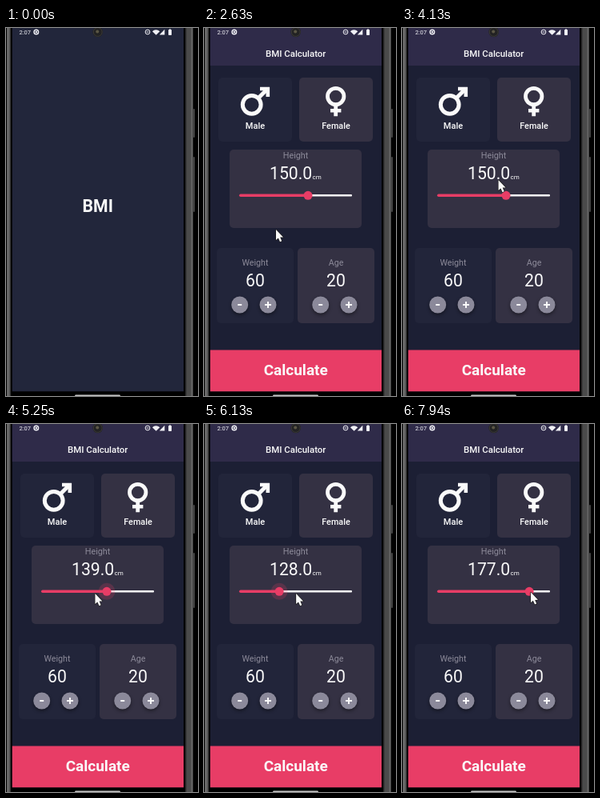
Recreate the animation shown at these times as an HTML page with a canvas. Size 240x460 px, loop 8000 ms.

```html
<!DOCTYPE html>
<html lang="en">
<head>
<meta charset="utf-8">
<title>BMI Calculator</title>
<style>
html, body { margin: 0; width: 240px; height: 460px; overflow: hidden; background: #000; }
canvas { display: block; width: 240px; height: 460px; }
</style>
</head>
<body>
<canvas id="stage"></canvas>
<script>
const LOOP = 8000;
const RED = '#e83d66', CARD = '#343143', DIM = '#22253a', GREY = '#8d8b9a', WHITE = '#fafafa';
const SCREEN = { x: 7.5, w: 214.5, h: 454.4 };
const canvas = document.getElementById('stage');
const ctx = canvas.getContext('2d');
const dpr = window.devicePixelRatio || 1;
canvas.width = 240 * dpr;
canvas.height = 460 * dpr;

// Cursor position while free: time, x or y
const freeX = [[2360, 90], [2900, 90], [3560, 101], [4130, 120.5], [4400, 129], [4700, 130]];
const freeY = [[2360, 252], [2900, 252], [3560, 230], [4130, 190], [4300, 192], [4650, 211], [5250, 212], [6130, 212], [7940, 210.3]];
// Pointer position along the slider
const drag = [[4700, 130], [4950, 130], [5130, 126], [5190, 116], [5250, 111.5], [5720, 80],
  [6010, 94], [6070, 103], [6130, 115], [6500, 151], [7050, 100], [7450, 112],
  [7820, 159], [7880, 163], [7940, 161], [8000, 160]];

const clamp = (v, a = 0, b = 1) => Math.min(b, Math.max(a, v));
const ramp = (t, a, b) => clamp((t - a) / (b - a));

// Smooth curve through key points, flat at turning points
function along(keys, t) {
  const n = keys.length - 1;
  if (t <= keys[0][0]) return keys[0][1];
  if (t >= keys[n][0]) return keys[n][1];
  let i = 0;
  while (keys[i + 1][0] < t) i++;
  const slope = k => (keys[k + 1][1] - keys[k][1]) / (keys[k + 1][0] - keys[k][0]);
  const tangent = k => {
    if (k === 0 || k === n) return 0;
    const a = slope(k - 1), b = slope(k);
    return a * b <= 0 ? 0 : 2 * a * b / (a + b);
  };
  const [t0, a] = keys[i], [t1, b] = keys[i + 1];
  const h = t1 - t0, u = (t - t0) / h, w = 1 - u;
  return a * w * w * (1 + 2 * u) + b * u * u * (3 - 2 * u)
    + h * u * w * (w * tangent(i) - u * tangent(i + 1));
}

function rect(x, y, w, h, color, r = 0) {
  ctx.fillStyle = color;
  ctx.beginPath();
  ctx.roundRect(x, y, w, h, r);
  ctx.fill();
}

function disc(x, y, r, color) {
  ctx.fillStyle = color;
  ctx.beginPath();
  ctx.arc(x, y, r, 0, 7);
  ctx.fill();
}

function ring(x, y, r, width, color) {
  ctx.strokeStyle = color;
  ctx.lineWidth = width;
  ctx.beginPath();
  ctx.arc(x, y, r, 0, 7);
  ctx.stroke();
}

function path(points, width, color) {
  ctx.strokeStyle = color;
  ctx.lineWidth = width;
  ctx.beginPath();
  points.forEach(([x, y]) => ctx.lineTo(x, y));
  ctx.stroke();
}

function poly(points, color) {
  ctx.fillStyle = color;
  ctx.beginPath();
  points.forEach(([x, y]) => ctx.lineTo(x, y));
  ctx.closePath();
  ctx.fill();
}

function text(str, x, y, size, weight = 400, color = WHITE, align = 'center') {
  ctx.font = `${weight} ${size}px Roboto, sans-serif`;
  ctx.textAlign = align;
  ctx.fillStyle = color;
  ctx.fillText(str, x, y);
}

function statusBar(color) {
  text('2:07', 16.5, 8, 7.5, 400, color, 'left');
  ring(37.8, 5, 2.8, 1.4, color);
  disc(37.8, 5, 1.3, color);
  ring(177, 5, 2.9, 1, color);
  path([[175.5, 5], [178.5, 5]], 1, color);
  ctx.fillStyle = color;
  ctx.beginPath();
  ctx.moveTo(187.6, 8.8);
  ctx.arc(187.6, 8.6, 6.4, -Math.PI * 0.76, -Math.PI * 0.24);
  ctx.fill();
  poly([[191.8, 8.5], [198.3, 8.5], [198.3, 1.8]], color);
  rect(203, 2, 4, 7, color, 0.8);
  rect(204.2, 1.2, 1.6, 1, color);
}

function splash() {
  rect(SCREEN.x, 0, SCREEN.w, SCREEN.h, '#22263b');
  text('BMI', 114.7, 230, 21.2, 700);
}

function maleIcon() {
  ring(59.7, 95.8, 11.4, 5, WHITE);
  path([[67.5, 88], [79, 76.5]], 5, WHITE);
  path([[70, 76], [79.8, 76], [79.8, 86]], 4.6, WHITE);
}

function femaleIcon() {
  ring(164.7, 85.5, 10.2, 4.8, WHITE);
  path([[164.7, 96], [164.7, 110.3]], 4.8, WHITE);
  path([[158, 103.3], [171.4, 103.3]], 4.6, WHITE);
}

function roundButton(x, plus) {
  ctx.save();
  ctx.shadowColor = 'rgba(0,0,0,.45)';
  ctx.shadowBlur = 4 * dpr;
  ctx.shadowOffsetY = 2 * dpr;
  disc(x, 346, 10.5, '#8b899a');
  ctx.restore();
  const arm = plus ? 4 : 2.5;
  path([[x - arm, 346], [x + arm, 346]], 2, WHITE);
  if (plus) path([[x, 342], [x, 350]], 2, WHITE);
}

function counter(x, w, color, label, value) {
  const mid = x + w / 2;
  rect(x, 275, w, 94, color, 5);
  text(label, mid, 297, 10.7, 400, GREY);
  text(value, mid, 322.5, 21.2, 400);
  roundButton(mid - 19.3, false);
  roundButton(mid + 16, true);
}

function slider(t) {
  const height = Math.round(80 + 115 * (along(drag, t - 60) - 44) / 141);
  const x = along(drag, t - 120);
  text(height.toFixed(1), 82, 189.4, 21.2, 400, WHITE, 'left');
  text('cm', 135.6, 189.4, 8, 400, WHITE, 'left');
  rect(x, 208.1, 185 - x, 2.4, WHITE, 1);
  rect(44, 207.6, x - 44, 3.4, RED, 1.7);
  const press = ramp(t, 4720, 4880);
  if (press > 0) {
    ctx.save();
    ctx.globalAlpha = 0.2 * (1 - ramp(t, 7750, 7920));
    disc(x, 209.3, 5.5 + 5 * press, RED);
    ctx.restore();
  }
  disc(x, 209.3, 5.5, RED);
}

function calculator(t) {
  rect(SCREEN.x, 0, SCREEN.w, SCREEN.h, '#1c1f34');
  rect(SCREEN.x, 0, SCREEN.w, 47, '#2f2b49');
  text('BMI Calculator', 114.7, 35.7, 11.4, 500);
  rect(18, 62, 92, 80, DIM, 5);
  rect(119, 62, 92, 80, CARD, 5);
  maleIcon();
  femaleIcon();
  text('Male', 64, 126.2, 11, 500);
  text('Female', 165, 126.2, 10.8, 500);
  rect(32, 152, 165, 98, CARD, 5);
  text('Height', 114.5, 163.3, 10.8, 400, GREY);
  slider(t);
  counter(16, 96, DIM, 'Weight', '60');
  counter(117, 96, CARD, 'Age', '20');
  rect(SCREEN.x, 402.5, SCREEN.w, SCREEN.h - 402.5, RED);
  text('Calculate', 114.7, 434.2, 19, 700);
}

function phone() {
  rect(0, 0, 240, 460, '#000');
  rect(1, 0, 4.5, 460, '#686868');
  rect(4.5, 0, 1, 460, '#3c3c3c');
  rect(224.5, 0, 9, 460, '#4a4a4a');
  rect(224.5, 0, 1, 460, '#2c2c2c');
  rect(231.5, 0, 2, 460, '#666');
  rect(234, 101, 2, 36, '#444', 1);
  rect(234, 161, 2, 69, '#444', 1);
  rect(86, 458.6, 57, 3, '#c8c8c8', 1.5);
}

function camera() {
  disc(114.7, 5, 6.3, '#222223');
  ring(114.7, 5, 5.4, 1, '#3a3936');
  disc(114.2, 4.6, 2, '#5a5645');
}

function cursor(t) {
  const x = t < 4700 ? along(freeX, t) : along(drag, t);
  const y = along(freeY, t);
  const shape = [[0, 0], [0, 13], [2.9, 10.4], [5, 15.2], [7.2, 14.2], [5.2, 9.6], [9, 9.4]];
  const pts = shape.map(([a, b]) => [x + a, y + b]);
  ctx.lineJoin = 'round';
  path([...pts, pts[0]], 1.4, '#1a1a1a');
  ctx.lineJoin = 'miter';
  poly(pts, WHITE);
}

function draw(t) {
  ctx.setTransform(dpr, 0, 0, dpr, 0, 0);
  phone();
  ctx.save();
  ctx.beginPath();
  ctx.rect(SCREEN.x, 0, SCREEN.w, SCREEN.h);
  ctx.clip();
  const open = ramp(t, 2060, 2360);
  const ease = 1 - (1 - open) ** 3;
  if (open < 1) splash();
  if (open > 0) {
    ctx.save();
    ctx.globalAlpha = ease;
    const zoom = 0.9 + 0.1 * ease;
    ctx.translate(115, 227);
    ctx.scale(zoom, zoom);
    ctx.translate(-115, -227);
    calculator(t);
    ctx.restore();
  }
  const dark = ramp(t, 40, 190) * (1 - ease);
  const mix = (a, b) => Math.round(a + (b - a) * dark);
  statusBar(`rgb(${mix(240, 17)},${mix(240, 19)},${mix(245, 31)})`);
  camera();
  ctx.restore();
  if (t >= 2360) cursor(t);
}

function tick() {
  draw(performance.now() % LOOP);
  requestAnimationFrame(tick);
}
tick();
</script>
</body>
</html>
```
